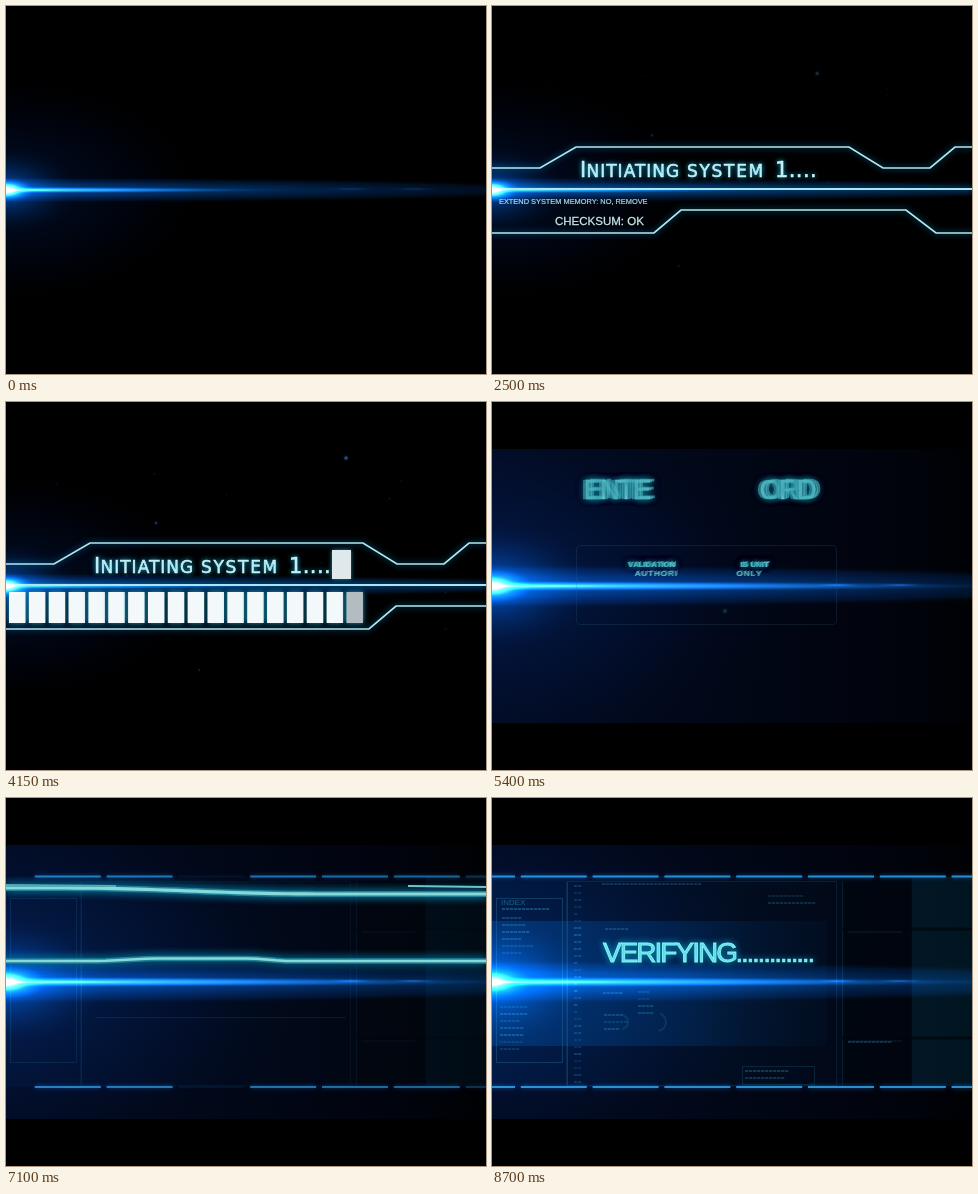
These frames come from a looping animation (480 by 368 pixels, 8750 ms). An HTML page with a canvas:

```html
<!DOCTYPE html>
<html lang="en">
<head>
<meta charset="utf-8">
<title>System start</title>
<style>
html, body { margin: 0; width: 100%; height: 100%; overflow: hidden; background: #000; }
canvas { display: block; width: 100vw; height: 100vh; }
</style>
</head>
<body>
<canvas id="stage" width="480" height="368"></canvas>
<script>
const LOOP = 8750, STEP = 50, MID = 183, BEAM = 184;
const TOP = 47, BOTTOM = 321;
const SANS = '"Liberation Sans", Arial, sans-serif';
const WIDE = '"DejaVu Sans", Verdana, sans-serif';
const c = document.getElementById('stage').getContext('2d');

const clamp = v => Math.max(0, Math.min(1, v));
const ramp = (t, a, b) => clamp((t - a) / (b - a));
const ease = v => v * v * (3 - 2 * v);
const rand = n => { const s = Math.sin(n * 127.1 + 11.7) * 43758.5453; return s - Math.floor(s); };

function layer(alpha, draw) {
  if (alpha <= 0) return;
  c.save();
  c.globalAlpha *= alpha;
  draw();
  c.restore();
}

function glow(x, y, rx, ry, stops) {
  c.save();
  c.globalCompositeOperation = 'lighter';
  c.translate(x, y);
  c.scale(rx, ry);
  const g = c.createRadialGradient(0, 0, 0, 0, 0, 1);
  stops.forEach(([p, col]) => g.addColorStop(p, col));
  c.fillStyle = g;
  c.fillRect(-1, -1, 2, 2);
  c.restore();
}

function type(text, x, y, size, color, { font = SANS, weight = '', gap = 0, edge = 0 } = {}) {
  c.font = `${weight} ${size}px ${font}`;
  c.letterSpacing = gap + 'px';
  c.fillStyle = c.strokeStyle = color;
  c.fillText(text, x, y);
  if (edge) {
    c.lineWidth = edge;
    c.strokeText(text, x, y);
  }
}

function line(points, color, width = 1) {
  c.beginPath();
  points.forEach(([x, y], i) => i ? c.lineTo(x, y) : c.moveTo(x, y));
  c.strokeStyle = color;
  c.lineWidth = width;
  c.stroke();
}

function halo(color, blur) {
  c.shadowColor = color;
  c.shadowBlur = blur;
}

// Light source at the left edge with its horizontal streak
function flare(power) {
  const k = 1 + power * .45;
  c.save();
  c.beginPath();
  c.rect(0, TOP, 480, BOTTOM - TOP);
  c.clip();
  glow(0, BEAM, 215 * k, 125 * k, [[0, 'rgba(0,50,115,.5)'], [.3, 'rgba(0,24,70,.38)'],
    [.65, 'rgba(0,8,32,.3)'], [1, 'rgba(0,0,0,0)']]);
  glow(0, BEAM, 75 * k, 46 * k, [[0, 'rgba(0,105,200,.7)'], [.35, 'rgba(0,60,135,.4)'],
    [1, 'rgba(0,0,0,0)']]);
  glow(0, BEAM, 620 + 120 * power, 13 + 9 * power, [[0, 'rgba(0,95,190,.65)'],
    [.45, 'rgba(0,65,140,.55)'], [.8, 'rgba(0,32,75,.4)'], [1, 'rgba(0,0,0,0)']]);
  glow(0, BEAM, 300 + 270 * power, 3.5 + 2 * power, [[0, '#b8f4ff'], [.25, 'rgba(70,170,230,.8)'],
    [.6, 'rgba(15,85,155,.6)'], [1, 'rgba(0,0,0,0)']]);
  core(k);
  for (const x of [345, 408])
    glow(x, BEAM - 1, 28, 2, [[0, `rgba(25,95,165,${.35 + .3 * power})`], [1, 'rgba(0,0,0,0)']]);
  c.restore();
}

function core(k) {
  glow(0, BEAM, 28 * k, 12 * k, [[0, '#ffffff'], [.3, 'rgba(170,235,255,.75)'],
    [.6, 'rgba(60,160,230,.3)'], [1, 'rgba(0,80,190,0)']]);
}

function dust(t) {
  layer(ramp(t, 1900, 3000) * (1 - ramp(t, 4550, 4950)), () => {
    const age = (t - 4150) / 1000;
    for (let i = 0; i < 11; i++) {
      const x = 15 + rand(i + 2) * 430 + age * (rand(i + 30) - .5) * 24;
      const y = 65 + rand(i + 60) * 225 + age * (rand(i + 90) - .5) * 18;
      glow(x, y, 2, 2, [[0, `rgba(30,100,190,${.1 + rand(i + 5) * .2})`], [1, 'rgba(0,0,0,0)']]);
    }
    glow(340 + age * 9, 56 - age * 7, 3.5, 3.5, [[0, 'rgba(65,155,255,.9)'], [1, 'rgba(0,0,0,0)']]);
    glow(150 - age * 6, 121 - age * 5, 2.8, 2.8, [[0, 'rgba(35,100,210,.8)'], [1, 'rgba(0,0,0,0)']]);
    glow(193 + age * 4, 268 + age * 5, 2, 2, [[0, 'rgba(35,90,180,.7)'], [1, 'rgba(0,0,0,0)']]);
  });
}

function rails(t) {
  const shift = 201 * ease(ramp(t, 2700, 3550));
  const open = ease(ramp(t, 100, 750));
  const top = [[-2, 162], [48, 162], [84, 141], [357, 141], [391, 162], [438, 162], [463, 141], [482, 141]];
  const low = [[-2, 227], [162 + shift, 227], [189 + shift, 204], [414 + shift, 204], [444 + shift, 227], [682, 227]];
  c.save();
  c.beginPath();
  c.rect(0, 0, 480 * open, 368);
  c.clip();
  halo('#087bb5', 6);
  line(top, '#b3e9ee', 1.7);
  line(low, '#b3e9ee', 1.7);
  line([[0, MID], [480, MID]], '#a9e5f2', 2);
  c.restore();
}

function heading(t) {
  const parts = [['I', 88, 21, .5], ['NITIATING', 94.5, 17, 1], ['SYSTEM', 195, 17, 1.7], ['1....', 283, 21, .4]];
  let left = Math.floor(ramp(t, 350, 900) * 21);
  let end = 88;
  c.save();
  halo('#14a2cc', 5);
  for (const [word, x, size, gap] of parts) {
    const shown = word.slice(0, Math.max(0, left));
    left -= word.length;
    if (!shown) break;
    type(shown, x, 170.5, size, '#dcfbfb', { font: WIDE, gap, edge: .5 });
    end = x + c.measureText(shown).width;
  }
  c.restore();
  const caret = t >= 350 && (t < 1000 || t % 1000 < 500);
  if (caret) {
    c.save();
    halo('#1a8fb8', 4);
    c.fillStyle = '#dfe9ec';
    c.fillRect(t < 900 ? end + 2 : 326, 148, 19, 29);
    c.restore();
  }
}

// Short status lines that replace each other in the lower left panel
function readout(t) {
  if (t < 750 || t >= 2700) return;
  c.save();
  c.beginPath();
  c.rect(0, 184, 180, 43);
  c.clip();
  if (t < 1500) {
    const up = (t - 1000) / 50;
    layer(.6, () => {
      type('SOFTWARE', 8, 191 - up, 12, '#75b4c8', { gap: .4 });
      type('418.25.65.9', 99, 191 - up, 12, '#75b4c8', { gap: .5 });
    });
    const rows = ['<Protocol>', 'SCANNING 18.5.1.18A', 'CONNECTING 68.8.1.18', 'CONNECTION 68.68.08'];
    rows.forEach((row, i) => {
      const n = Math.floor(ramp(t, 750 + i * 40, 950 + i * 40) * row.length);
      type(row.slice(0, n), 8, 201 + i * 7.5, 6.2, '#b0dce3', { weight: 'bold', gap: -.35 });
      layer(.5, () => type(row.slice(0, n), 9 + rand(i + t) * 2, 202.5 + i * 7.5, 6.2, '#7fb7c8', { gap: -.3 }));
    });
  } else {
    const notes = ['CHECK SYSTEM MEMORY: OK, PROCEED', 'EXTEND SYSTEM MEMORY: NO, REMOVE'];
    const i = t < 1950 ? 0 : 1, start = 1500 + i * 450;
    const n = Math.floor(ramp(t, start, start + 300) * notes[i].length);
    type(notes[i].slice(0, n), 7, 197.5, 7.4, '#acdce5', { edge: .2 });
    if (t >= 2150) type('CHECKSUM: OK', 63, 219, 11.5, '#c6e8ed', { edge: .3 });
  }
  c.restore();
}

function progress(t) {
  const count = Math.floor(ramp(t, 2750, 4150) * 18);
  c.save();
  halo('#18a5cf', 5);
  for (let i = 0; i < count; i++) {
    const fresh = i === count - 1 && t < 4250;
    c.fillStyle = fresh ? '#b3bdc1' : '#f3f9fa';
    c.fillRect(3 + i * 19.85, 190, 16.5, 31);
  }
  c.restore();
}

function boot(t) {
  layer(1 - ramp(t, 4500, 4850), () => {
    rails(t);
    heading(t);
    readout(t);
    progress(t);
  });
}

function backdrop(t) {
  const g = c.createLinearGradient(0, 0, 480, 0);
  g.addColorStop(0, '#020c22');
  g.addColorStop(.6, '#010614');
  g.addColorStop(.88, '#01030b');
  g.addColorStop(1, '#000103');
  c.fillStyle = g;
  layer(ramp(t, 4550, 5200), () => c.fillRect(0, TOP, 480, BOTTOM - TOP));
}

// Letters arrive from both ends toward the middle, with short lived echoes
function gather(text, x, y, size, gap, t, start, pace, style = {}) {
  const half = text.length / 2;
  const loose = 1 - ramp(t, start + 350, start + 700);
  const look = { gap, edge: size / 45, ...style };
  [...text].forEach((ch, i) => {
    const born = start + (i < half ? i * pace : (text.length - 1 - i) * pace + 100);
    if (t < born) return;
    type('', 0, 0, size, '#000', look);
    const px = x + c.measureText(text.slice(0, i)).width;
    type(ch, px, y, size, '#8fe6ea', look);
    for (const d of [-.1, .1, .18])
      layer(.5 * loose, () => type(ch, px + d * size, y - d * 4, size, '#5cc4cc', look));
  });
}

function password(t) {
  const alpha = ramp(t, 4950, 5300) * (1 - ramp(t, 6450, 6850));
  layer(alpha, () => {
    c.save();
    c.setLineDash([1, 1]);
    c.lineWidth = 1;
    c.strokeStyle = 'rgba(40,110,140,.42)';
    c.beginPath();
    c.roundRect(84.5, 143.5, 260, 79, 4);
    c.stroke();
    c.restore();
    c.save();
    halo('#137b92', 6);
    gather('ENTER PASSWORD', 92, 97, 27, -1.7, t, 5100, 80);
    gather('VALIDATION PENDING ON THIS UNIT', 136, 165, 7.6, .2, t, 5060, 35, { weight: 'bold' });
    c.restore();
    layer(.65, () => gather('AUTHORISED USERS ONLY', 143, 174, 8, 1, t, 5130, 40));
    const n = Math.floor(ramp(t, 5650, 6300) * 8);
    if (n) type('*'.repeat(n), 171, 215, 20, '#a0e8e9', { gap: 4 });
    else glow(233, 209, 4, 4, [[0, 'rgba(40,125,130,.55)'], [1, 'rgba(0,0,0,0)']]);
  });
}

function smallRows(x, y, count, width, seed, step = 7) {
  for (let i = 0; i < count; i++) {
    c.fillStyle = `rgba(45,140,175,${.15 + rand(i + seed) * .25})`;
    const w = width * (.5 + rand(i + seed + 8) * .5);
    for (let px = 0; px < w; px += 4) c.fillRect(x + px, y + i * step, 3.3, 2);
  }
}

function panels(t) {
  const late = ramp(t, 7150, 7800);
  layer(ramp(t, 6400, 7100) * .5 + late * .5, () => {
    const wash = c.createLinearGradient(0, 0, 480, 0);
    wash.addColorStop(0, 'rgba(0,36,80,.4)');
    wash.addColorStop(.7, 'rgba(0,20,42,.3)');
    wash.addColorStop(1, 'rgba(0,16,30,.3)');
    c.fillStyle = wash;
    c.fillRect(0, 79, 480, 210);
    const band = c.createLinearGradient(0, 0, 335, 0);
    band.addColorStop(0, 'rgba(0,75,150,.42)');
    band.addColorStop(.6, 'rgba(0,55,110,.38)');
    band.addColorStop(1, 'rgba(0,35,70,.15)');
    layer(late, () => {
      c.fillStyle = band;
      c.fillRect(0, 123, 335, 125);
    });
    c.fillStyle = 'rgba(3,38,58,.48)';
    c.fillRect(420, 79, 60, 209);
    c.fillStyle = 'rgba(0,4,10,.5)';
    c.fillRect(352, 82, 66, 206);
    c.lineWidth = 1;
    c.strokeStyle = 'rgba(38,105,135,.4)';
    c.strokeRect(4.5, 100.5, 66, 164);
    c.strokeStyle = 'rgba(28,90,120,.25)';
    c.strokeRect(75.5, 83.5, 269, 204);
    line([[75, 84], [75, 288]], 'rgba(28,95,125,.35)', 1.5);
    line([[350.5, 84], [350.5, 288]], 'rgba(28,88,112,.28)');
    layer(1 - late, () => line([[90, 219.5], [340, 219.5]], 'rgba(28,90,110,.5)'));
    for (const y of [131, 240]) {
      line([[350, y], [480, y]], 'rgba(0,5,12,.7)', 3);
      line([[356, y + 3], [410, y + 3]], 'rgba(30,95,125,.3)');
    }
  });
  layer(ramp(t, 7250, 8000), () => {
    type('INDEX', 9, 107, 8, 'rgba(55,145,175,.55)');
    smallRows(10, 110, 1, 52, 4);
    smallRows(10, 119, 6, 32, 12);
    smallRows(8, 208, 7, 30, 25);
    smallRows(82, 87, 29, 7, 42);
    smallRows(110, 85, 1, 110, 86);
    smallRows(113, 130, 1, 40, 90);
    smallRows(276, 97, 2, 50, 100);
    smallRows(111, 194, 1, 32, 118);
    smallRows(112, 216, 3, 24, 120);
    smallRows(146, 193, 4, 16, 140);
    smallRows(253, 272, 2, 62, 150);
    smallRows(356, 243, 1, 54, 160);
    c.strokeStyle = 'rgba(35,115,140,.25)';
    c.lineWidth = 1;
    c.strokeRect(250.5, 268.5, 72, 18);
    for (const [x, r] of [[129, 7], [165, 9]]) {
      c.beginPath();
      c.arc(x, 224, r, -1.2, 1.4);
      c.lineWidth = 2;
      c.stroke();
    }
  });
}

function dashes(t) {
  const show = ramp(t, 6600, 7050);
  const grow = ramp(t, 7100, 7600);
  const early = [0, .85, .8, .08, .75, .7, .65, .3];
  layer(show, () => {
    c.save();
    halo('#0059a8', 4);
    for (const y of [78.5, 289]) {
      early.forEach((base, i) => {
        const x = -43 + i * 71.8;
        layer(base + (1 - base) * grow, () => line([[x, y], [x + 66, y]], '#2f8ccb', 1.8));
      });
    }
    c.restore();
  });
}

function streaks(t) {
  const show = ramp(t, 6700, 7000) * (1 - ramp(t, 7200, 7450));
  const bend = 1 + (t - 7100) / 600;
  const trace = (y, curve, w) => {
    const pts = [];
    for (let x = 0; x <= 480; x += 10) pts.push([x, y + curve(x) * bend]);
    c.save();
    halo('#087ba2', 10);
    line(pts, '#258395', w + 3);
    line(pts, '#88d8d9', w);
    c.restore();
  };
  layer(show, () => {
    trace(90, x => 6 * ease(ramp(x, 60, 310)), 3.2);
    trace(163, x => -2.5 * ease(ramp(x, 90, 150)) * (1 - ease(ramp(x, 240, 285))), 2.5);
    line([[0, 87], [110, 88]], '#53abb5', 2);
    line([[402, 88], [480, 89]], '#6fc5cc', 2);
  });
}

function verifying(t) {
  layer(ramp(t, 7250, 7500), () => {
    const dots = Math.floor(ramp(t, 7550, 8550) * 14);
    const wide = 1 - ease(ramp(t, 7250, 7550));
    c.save();
    halo('#0799bd', 7);
    type('VERIFYING', 111, 164, 28, '#86f3f8', { gap: -2, edge: .9 });
    type('.'.repeat(dots), 243.5, 164, 28, '#86f3f8', { gap: -2.25, edge: .7 });
    c.restore();
    for (const d of [-24, -12, 12, 24])
      layer(.3 * wide, () => type('VERIFYING', 111 + d * wide, 164, 28, '#48b8c5', { gap: -2 }));
  });
}

function paint(t) {
  c.fillStyle = '#000';
  c.fillRect(0, 0, 480, 368);
  backdrop(t);
  panels(t);
  dashes(t);
  const pulse = ramp(t, 4500, 4750) * (1 - ramp(t, 4750, 5200));
  flare(ramp(t, 4500, 5200) + pulse * .5);
  dust(t);
  boot(t);
  password(t);
  streaks(t);
  verifying(t);
  // Keep the white core above the rails
  layer(.6, () => core(.8));
}

const begin = performance.now();
function tick() {
  const t = (performance.now() - begin) % LOOP;
  paint(Math.floor(t / STEP) * STEP);
  requestAnimationFrame(tick);
}
tick();
</script>
</body>
</html>
```
